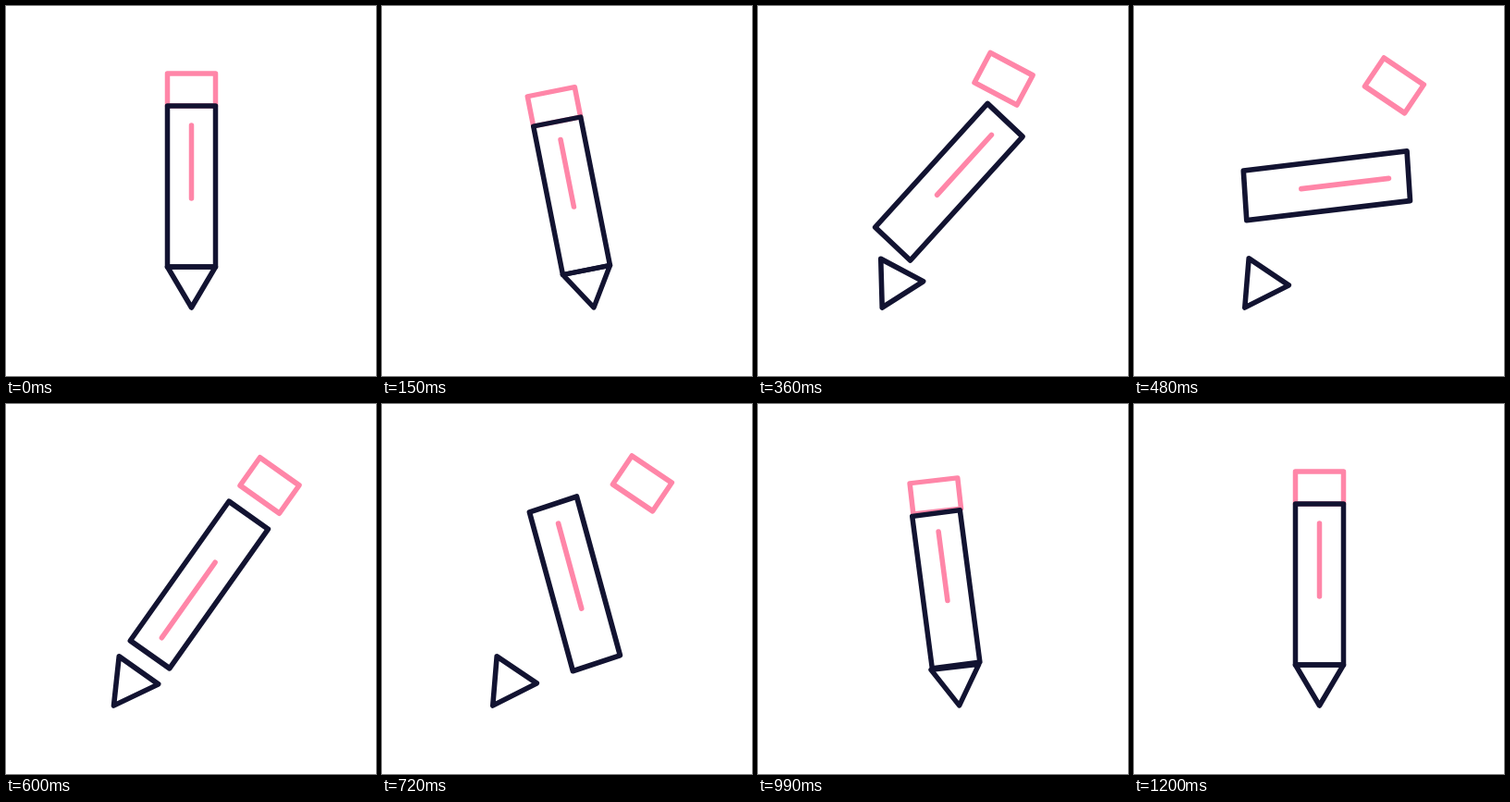
An HTML page that plays this animation: 400x400 px, repeating every 6820 ms.

```html
<!DOCTYPE html>
<html lang="en">
<head>
<meta charset="utf-8">
<title>Pencil</title>
<style>
  html, body { margin: 0; width: 100%; height: 100%; overflow: hidden; background: #fff; }
  svg { display: block; width: 100vw; height: 100vh; }
  path { fill: none; stroke: #121331; stroke-width: 5.5; stroke-linecap: round; stroke-linejoin: round; }
  .pink { stroke: #ff86a8; }
</style>
</head>
<body>
<svg viewBox="0 0 400 400">
  <!-- The origin of the pencil is the point of its tip -->
  <g id="pencil">
    <path id="eraser" class="pink" d="M-26-253H26V-218H-26Z"/>
    <g id="body">
      <path id="shine" class="pink"/>
      <path d="M-26-87H26V87H-26Z"/>
    </g>
    <path d="M-26-44H26L0 0Z"/>
  </g>
</svg>
<script>
const LOOP = 6820, FRAME = 30, MIDDLE = 600, WINDUP = 150;
const [pencil, eraser, body, shine] =
  ['pencil', 'eraser', 'body', 'shine'].map(id => document.getElementById(id));

const mix = (a, b, k) => a + (b - a) * k;

// cubic-bezier(x1, 0, x2, 1)
function ease(x1, x2, x) {
  if (x <= 0) return 0;
  if (x >= 1) return 1;
  let low = 0, high = 1, s;
  for (let i = 0; i < 30; i++) {
    s = (low + high) / 2;
    const at = 3 * s * (1 - s) ** 2 * x1 + 3 * s * s * (1 - s) * x2 + s ** 3;
    if (at < x) low = s; else high = s;
  }
  return s * s * (3 - 2 * s);
}

function draw(time) {
  const t = Math.min(Math.floor(time / FRAME) * FRAME, 2 * MIDDLE);
  // Everything but the spin runs out and back, mirrored in time
  const there = MIDDLE - Math.abs(t - MIDDLE);
  const windup = ease(.33, .67, there / WINDUP);
  const swing = (there - WINDUP) / (MIDDLE - WINDUP);
  const open = ease(.33, 0, swing);

  const x = mix(200.5, 229, windup) - 112.5 * open;
  const tilt = -11.2 * windup + 46.5 * open;
  const stretch = mix(1, .94, windup) + .12 * open;
  const gap = 19.8 * open;
  const spin = 360 * ease(.79, .21, (t - WINDUP) / (2 * (MIDDLE - WINDUP)));
  const shineEnd = 13 + 15 * ease(.8, .2, swing);

  pencil.setAttribute('transform', `translate(${x} 326) rotate(${tilt}) scale(1 ${stretch})`);
  eraser.setAttribute('transform', `translate(0 ${-2 * gap})`);
  body.setAttribute('transform', `translate(0 ${-131 - gap}) rotate(${spin})`);
  shine.setAttribute('d', `M0-66V${shineEnd}`);
}

const start = performance.now();
function tick() {
  draw((performance.now() - start) % LOOP);
  requestAnimationFrame(tick);
}
tick();
</script>
</body>
</html>
```
